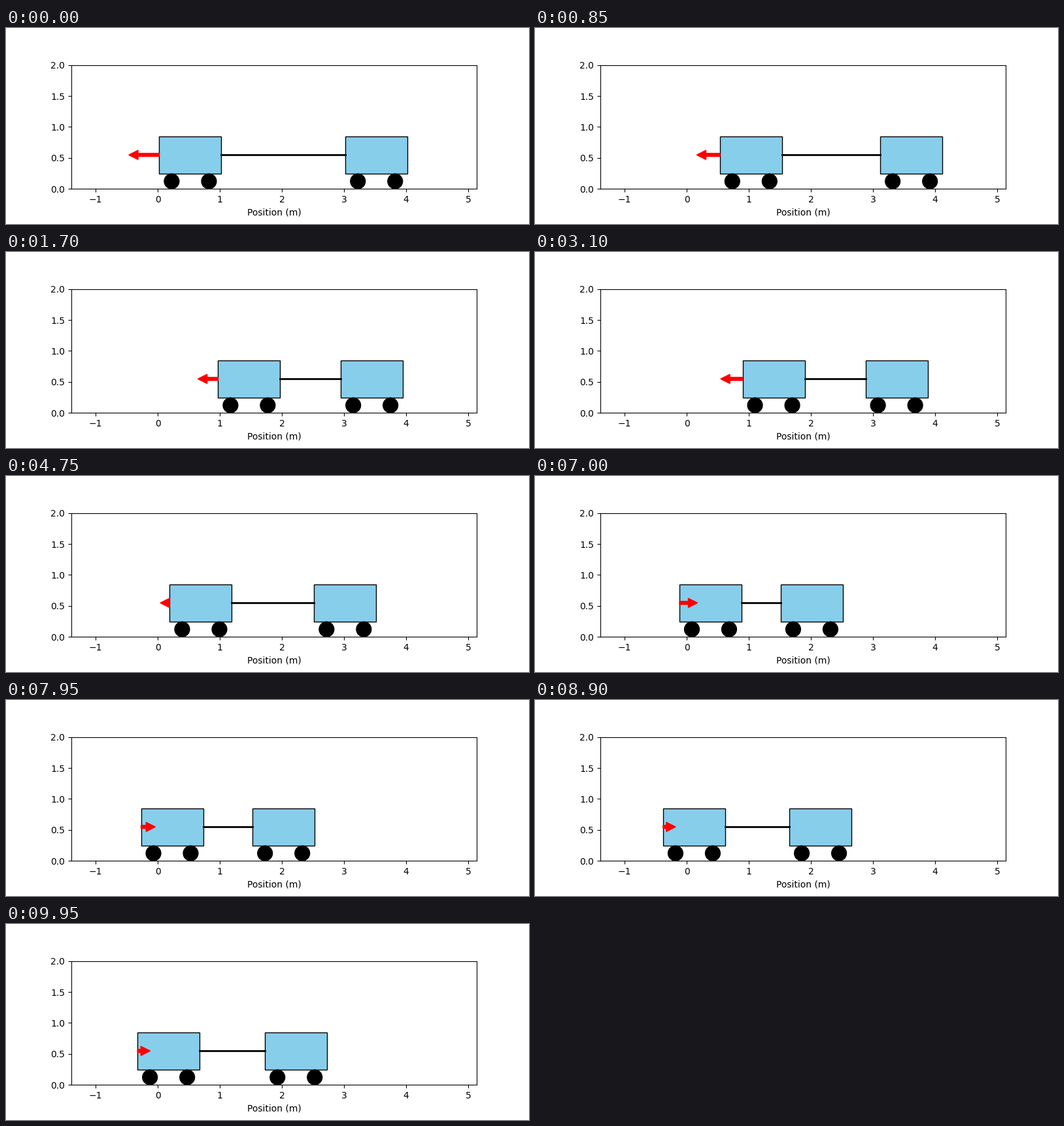
Recreate the animation shown at these times as a matplotlib script. Size 800x300 px, loop 10 s.

```python
import numpy as np
import matplotlib.pyplot as plt
from matplotlib.animation import FuncAnimation
from matplotlib.patches import Circle, FancyArrow, Rectangle

FRAMES, DT = 200, 0.05
STIFFNESS, DAMPING, REST = 1.0, 0.3, 2.0
KP, KD = 0.46, 0.47            # feedback on the right cart
BASE, HEIGHT = 0.25, 0.6
MID = BASE + HEIGHT / 2
WHEEL_Y, WHEEL_R = 0.125, 0.12
WHEEL_X = (0.2, 0.8)
HEAD = 0.15


def force(s):
    return -KP * (s[1] - REST) - KD * s[3]


def slope(s):
    x1, x2, v1, v2 = s
    pull = STIFFNESS * (x2 - x1 - REST) + DAMPING * (v2 - v1)
    return np.array([v1, v2, force(s) + pull, -pull])


def rk4(s, h):
    a = slope(s)
    b = slope(s + h / 2 * a)
    c = slope(s + h / 2 * b)
    d = slope(s + h * c)
    return s + h / 6 * (a + 2 * b + 2 * c + d)


def simulate():
    s, states = np.array([0.0, 3.0, 0.5, 0.5]), []
    for _ in range(FRAMES):
        s = rk4(s, DT)
        states.append(s)
    return states


class Cart:
    def __init__(self, ax):
        self.body = Rectangle((0, BASE), 1, HEIGHT, fc="skyblue", ec="black")
        self.wheels = [Circle((dx, WHEEL_Y), WHEEL_R, color="black")
                       for dx in WHEEL_X]
        for patch in (self.body, *self.wheels):
            ax.add_patch(patch)

    def move(self, x):
        self.body.set_x(x)
        for wheel, dx in zip(self.wheels, WHEEL_X):
            wheel.center = (x + dx, WHEEL_Y)


states = simulate()

fig, ax = plt.subplots(figsize=(8, 3), dpi=100)
ax.set_xlim(-1.39, 5.137)
ax.set_ylim(0, 2)
ax.set_aspect("equal")
ax.set_xlabel("Position (m)")

left, right = Cart(ax), Cart(ax)
rod, = ax.plot([], [], color="black", lw=2)
arrow = FancyArrow(0, MID, -0.3, 0, width=0.05, head_width=HEAD,
                   head_length=HEAD, color="red")
ax.add_patch(arrow)


def update(i):
    s = states[i]
    x1, x2 = s[:2]
    left.move(x1)
    right.move(x2)
    rod.set_data([x1 + 1, x2], [MID, MID])
    arrow.set_data(x=x1, dx=force(s) / 2)
    return rod, arrow


anim = FuncAnimation(fig, update, frames=FRAMES, interval=1000 * DT,
                     repeat=True, repeat_delay=0, blit=False)
plt.show()
```
